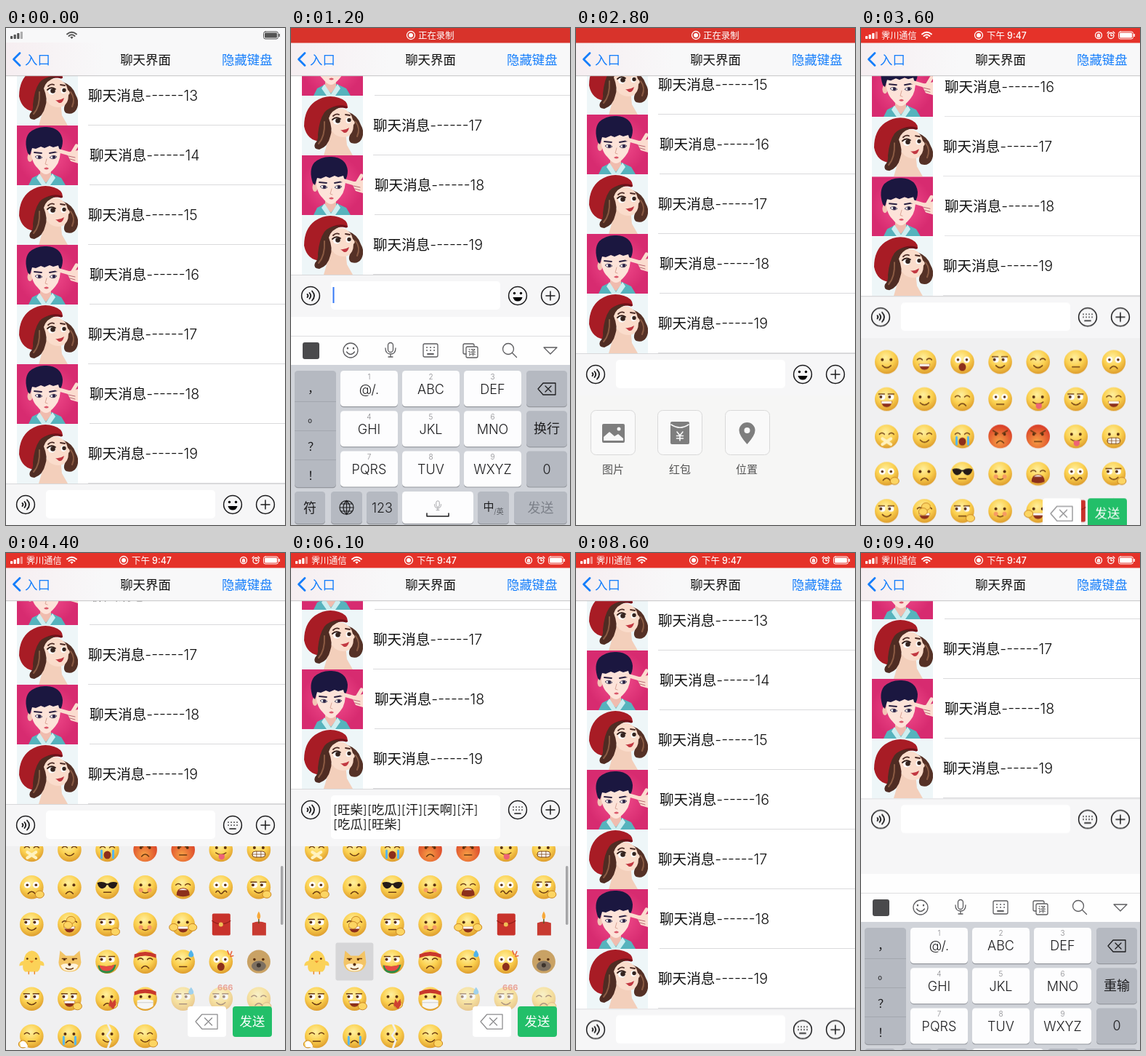
Recreate the animation shown at these times as an HTML page. Size 384 px wide and 683 px high, loop 9.5 s.

```html
<!DOCTYPE html>
<html lang="zh-CN">
<head>
<meta charset="utf-8">
<title>聊天界面</title>
<style>
html, body { margin: 0; width: 100%; height: 100%; overflow: hidden; background: #fff; }
svg { display: block; font-family: Inter, "Noto Sans CJK SC", "Noto Sans CJK", sans-serif; }
.mid { text-anchor: middle; }
.thin { font-weight: 300; }
.line { fill: none; stroke: currentColor; stroke-linecap: round; stroke-linejoin: round; }
.bar, .field, .kb, .panel, .rows, .thumb { animation: 9500ms ease-in-out infinite; }
.bar { animation-name: bar; }
.field { animation-name: field; }
.kb { animation-name: kb; }
.panel { animation-name: panel; }
.rows { animation-name: rows; }
.thumb { animation-name: thumb; }
@keyframes bar {
  0%, 8.42% { transform: translateY(626px); }
  11.58%, 25.26% { transform: translateY(339px); }
  28.42%, 35.79% { transform: translateY(447px); }
  38.95%, 61.58% { transform: translateY(345px); }
  62.4%, 69.68% { transform: translateY(324px); }
  70.5%, 78.37% { transform: translateY(345px); }
  82.63%, 90.53% { transform: translateY(626px); }
  93.68%, 96.84% { transform: translateY(345px); }
  98.8%, 100% { transform: translateY(337px); }
}
@keyframes field {
  0%, 61.58% { height: 39px; }
  62.4%, 69.68% { height: 60px; }
  70.5%, 100% { height: 39px; }
}
@keyframes kb {
  0%, 8.42% { transform: translateY(290px); }
  11.58%, 25.26% { transform: translateY(0); }
  28.42%, 96.84% { transform: translateY(290px); animation-timing-function: linear; }
  98.95% { transform: translateY(44px); }
  100% { transform: translateY(4px); }
}
@keyframes panel {
  0%, 35.79% { transform: translateY(505px); opacity: 1; }
  38.95%, 78.37% { transform: translateY(403px); opacity: 1; }
  82.63% { transform: translateY(684px); opacity: 0; }
  82.7%, 90.53% { transform: translateY(684px); opacity: 1; }
  93.68%, 96.84% { transform: translateY(403px); opacity: 1; }
  97.9%, 100% { transform: translateY(403px); opacity: 0; }
}
@keyframes rows {
  0%, 40% { transform: translateY(130px); animation-timing-function: ease-out; }
  45.26%, 100% { transform: translateY(0); }
}
@keyframes thumb {
  0%, 40% { transform: translateY(-25px); animation-timing-function: ease-out; }
  45.26%, 100% { transform: translateY(0); }
}
</style>
</head>
<body>
<svg width="384" height="683" viewBox="0 0 384 683">
  <defs>
    <radialGradient id="gold" cx=".45" cy=".32" r=".7">
      <stop offset="0" stop-color="#fff0a0"/><stop offset=".55" stop-color="#fbd04f"/><stop offset="1" stop-color="#dc9a2c"/>
    </radialGradient>
    <radialGradient id="angry" cx=".45" cy=".7" r=".8">
      <stop offset="0" stop-color="#f7a045"/><stop offset="1" stop-color="#d42c22"/>
    </radialGradient>
    <radialGradient id="pink">
      <stop offset="0" stop-color="#f4508f"/><stop offset="1" stop-color="#d72b70"/>
    </radialGradient>
    <linearGradient id="tint">
      <stop offset="0" stop-color="#f6eef1"/><stop offset=".35" stop-color="#f8f8f9"/>
    </linearGradient>
    <clipPath id="face"><rect width="84" height="82"/></clipPath>
    <clipPath id="sheet"><rect width="384" height="290"/></clipPath>

    <g id="boy" clip-path="url(#face)">
      <rect width="84" height="82" fill="url(#pink)"/>
      <path d="M16 82l5-10 12-6h15l13 6 6 10z" fill="#56b3bd"/>
      <path d="M32 58h15v12l-7 9-8-9z" fill="#f0bcae"/>
      <path d="M31 66l9 14 9-14 4 6-7 10H34l-7-10z" fill="#cdeef0"/>
      <ellipse cx="18" cy="44" rx="3.5" ry="6" fill="#f3c5b6"/>
      <path d="M19 28h41q1 20-7 29-8 10-13 10t-12-9Q19 50 19 28z" fill="#fde3d9"/>
      <path d="M15 38Q9 20 17 10 27 1 41 2q20 1 22 19 0 9-4 14l-2-7-7 2-5-2-7 3-5-2-7 3-5-1-3 10z" fill="#1b1740"/>
      <path class="line" d="M24 37l10 1M45 38l11-2" color="#2a2040" stroke-width="1.8"/>
      <path d="M25 43q5-4 10 1-5 4-10-1zM45 44q5-5 10-1-5 5-10 1z" fill="#fff" stroke="#2c2446" stroke-width=".8"/>
      <g fill="#2c2446"><circle cx="31" cy="43.500" r="2.200"/><circle cx="51" cy="43.500" r="2.200"/></g>
      <path class="line" d="M41 46l-2 7 3 1" color="#dba596" stroke-width="1"/>
      <path d="M37 59q4-3 7 0-3 3-7 0z" fill="#d9576a"/>
      <path class="line" d="M76 40L55 34M76 38l6-10" color="#fbdccf" stroke-width="5"/>
      <path d="M68 37l16-3v18l-10-3z" fill="#fbdccf"/>
      <path class="line" d="M71 42l9 2M73 46l7 2" color="#b86572" stroke-width="1"/>
    </g>
    <g id="girl" clip-path="url(#face)">
      <rect width="84" height="82" fill="#eef6f8"/>
      <path d="M63 22q14 5 18 18 6 10 1 20-5 8-14 5-5-3-2-11z" fill="#553126"/>
      <path d="M40 48h20l2 20 8 14H30z" fill="#f3cfbb"/>
      <path d="M3 42Q3 19 18 8 34-3 51 3q13 4 12 14-16-3-25 8-9 14-12 38Q7 62 3 42z" fill="#a81c25"/>
      <path class="line" d="M26 58Q26 30 37 21q10-9 24-5" color="#701019" stroke-width="3"/>
      <path d="M35 28q6-13 22-10 11 4 13 15 5 4 1 7 0 12-8 16-9 3-18-3-9-9-10-25z" fill="#fadccb"/>
      <path d="M53 16q-13 4-16 15 6 15 2 25-3 14-15 18-9-1-6-8 5-5 4-13 2-20 9-30 9-10 22-7z" fill="#4f2c23"/>
      <path class="line" d="M31 36q1 20-8 30M74 36q7 9 2 20" color="#8a5a43" stroke-width="2"/>
      <path class="line" d="M43 28q4-4 8-2M60 26l6 1" color="#4b2b25" stroke-width="1.800"/>
      <g fill="#fff"><ellipse cx="48" cy="35" rx="5" ry="4.500"/><ellipse cx="64" cy="34" rx="3.500" ry="4"/></g>
      <g fill="#35241f"><circle cx="49.500" cy="34.500" r="3.300"/><circle cx="65" cy="33.500" r="2.700"/></g>
      <path class="line" d="M42 33q5-5 11-1" color="#2f1c18" stroke-width="1.800"/>
      <path d="M53 47q6 1 12-3-2 8-7 7z" fill="#c23842"/>
    </g>
    <g id="keys-icon">
      <circle class="line" r="12.4" stroke-width="1.5"/>
      <path class="line" d="M-6-4h.1M-2-4h.1M2-4h.1M6-4h.1M-6 0h.1M-2 0h.1M2 0h.1M6 0h.1M-4 5h8" stroke-width="1.7"/>
    </g>
    <path id="erase" class="line" d="M-12 0l7-8H12V8H-5zM-2-4l8 8M6-4l-8 8"/>
    <path id="mic" class="line" d="M-3.5-6a3.5 3.5 0 0 1 7 0v6a3.5 3.5 0 0 1-7 0zM-7-2q0 8 7 8t7-8M0 6v4M-3 10h6"/>
  </defs>

  <rect width="384" height="683" fill="#fff"/>
  <g id="list" class="bar thin"></g>

  <g class="bar">
    <rect width="384" height="700" fill="#f6f6f7"/>
    <path d="M0 .5h384" stroke="#d8d8da"/>
    <rect class="field" x="55" y="9" width="233" height="39" rx="5" fill="#fff"/>
    <g class="line" color="#1c1c1e" stroke-width="1.5">
      <circle cx="27" cy="29" r="12.4"/>
      <path d="M22.500 27q2 2 0 4M25.500 25q3.500 4 0 8M29 22.500q6 6.500 0 13" stroke-width="1.800"/>
      <circle cx="357" cy="29" r="12.4"/>
      <path d="M351 29h12M357 23v12"/>
    </g>
    <g transform="translate(312 29)" color="#1c1c1e">
      <g data-on="0-3400">
        <circle class="line" r="12.4" stroke-width="1.5"/>
        <circle cx="-4.500" cy="-3.500" r="1.7"/><circle cx="4.500" cy="-3.500" r="1.7"/>
        <path d="M-6.500 2H6.500Q5 7.500 0 7.500T-6.500 2z"/>
      </g>
      <use href="#keys-icon" data-on="3400-9500"/>
    </g>
    <rect data-on="900-1500 2000-2400" x="57.500" y="17" width="2" height="22" fill="#3478f6"/>
    <g id="typed" class="thin" font-size="17.4" fill="#1b1b1b"></g>
    <text data-on="7445-8600" class="mid thin" x="169" y="36.500" font-size="18.500" fill="#a6a6a8">按住说话</text>
  </g>

  <g data-on="2400-3400" transform="translate(0 505)" fill="#7e7e7e">
    <rect width="384" height="178" fill="#f6f6f5"/>
    <g fill="#f9f9f9" stroke="#d9d9d9">
      <rect x="20.500" y="20.500" width="61" height="61" rx="7"/><rect x="112.500" y="20.500" width="61" height="61" rx="7"/><rect x="205.500" y="20.500" width="61" height="61" rx="7"/>
    </g>
    <rect x="36" y="39" width="31" height="26" rx="2"/>
    <path d="M38 62v-5l8-7 7 6 5-3 7 6v3z" fill="#f9f9f9"/><circle cx="59" cy="46" r="2.500" fill="#f9f9f9"/>
    <rect x="130" y="36" width="26" height="31" rx="2"/>
    <g class="line" color="#f9f9f9" stroke-width="1.6"><path d="M131 40q12 8 24 0M139 50l4 5 4-5M143 55v7M138.500 55.500h9M138.500 59h9"/></g>
    <path d="M235.500 67q-11-12-11-19a11 11 0 0 1 22 0q0 7-11 19z"/><circle cx="235.500" cy="48" r="4" fill="#f9f9f9"/>
    <g class="mid thin" font-size="15" fill="#555"><text x="51" y="107">图片</text><text x="143" y="107">红包</text><text x="235" y="107">位置</text></g>
  </g>

  <g class="panel" data-on="3400-9500">
    <g clip-path="url(#sheet)">
      <rect width="384" height="290" fill="#f0f0f1"/>
      <g id="emoji" class="rows"></g>
    </g>
    <rect class="thumb" data-on="3800-6700" x="378" y="27" width="3.500" height="81" rx="1.700" fill="#a6a6a8"/>
    <rect x="250" y="220" width="53" height="42" rx="4" fill="#fff"/>
    <use href="#erase" transform="translate(276 241) scale(1.25)" color="#8b8b8d" stroke-width="1"/>
    <rect x="312" y="220" width="54" height="42" rx="4" fill="#22bf69"/>
    <text class="mid" x="339" y="247" font-size="17.4" fill="#fff">发送</text>
  </g>

  <g class="kb">
    <rect y="397" width="384" height="66" fill="#fefefe"/>
    <path d="M0 423.500h384" stroke="#dedee0"/>
    <rect y="463" width="384" height="222" fill="#d0d3d9"/>
    <rect x="16" y="432" width="23" height="23" rx="3" fill="#4a4a4c"/>
    <g class="line" color="#5c5c5f" stroke-width="1.3">
      <circle cx="82" cy="443" r="10"/><path d="M78 440v.2M86 440v.2" stroke-width="2.400"/><path d="M76.500 445q5.500 7 11 0"/>
      <use href="#mic" x="137" y="442"/>
      <rect x="182" y="434" width="20" height="18" rx="2"/>
      <path d="M187 439h.1M192 439h.1M197 439h.1M187 443h.1M192 443h.1M197 443h.1M188 448h8" stroke-width="1.800"/>
      <path d="M241 448h-2q-2 0-2-2v-10q0-2 2-2h11q2 0 2 2v1"/><rect x="241" y="438" width="16" height="15" rx="2"/>
      <circle cx="299" cy="441" r="7.500"/><path d="M304.500 446.500l6 6M348 439h18l-9 9z"/>
    </g>
    <text class="mid" x="249" y="450" font-size="11" fill="#4a4a4c">译</text>
    <g id="keys" class="mid thin" font-size="18" fill="#1d1d1f"></g>
  </g>

  <rect y="20" width="384" height="46" fill="url(#tint)"/>
  <path d="M0 65.700h384" stroke="#c4c4c6"/>
  <path class="line" d="M19 34.500L10.500 43l8.500 8.500" color="#157efb" stroke-width="2.800"/>
  <g font-size="17.4" fill="#157efb">
    <g class="thin"><text x="26" y="49.500">入口</text><text x="297" y="49.500">隐藏键盘</text></g>
    <text class="mid" x="192" y="49.500" fill="#111" font-weight="500">聊天界面</text>
  </g>

  <rect width="384" height="20" fill="#f8f8f9"/>
  <rect data-on="300-3500" width="384" height="20.500" fill="#d8332b"/>
  <g data-on="300-3500" fill="#fff">
    <circle cx="165" cy="10" r="5.500" fill="none" stroke="#fff" stroke-width="1.300"/><circle cx="165" cy="10" r="3"/>
    <text x="175" y="14.500" font-size="12.400">正在录制</text>
  </g>
  <rect data-on="3500-9500" width="384" height="20.500" fill="#e53229"/>
  <g data-on="0-300" id="dark" color="#555" fill="#555"></g>
  <g data-on="3500-9500" color="#fff" fill="#fff">
    <g id="light"></g>
    <text x="28" y="14.500" font-size="12.200">霁川通信</text>
    <circle cx="162" cy="10" r="5.500" fill="none" stroke="#fff" stroke-width="1.300"/><circle cx="162" cy="10" r="3"/>
    <text x="173" y="14.500" font-size="12.400" font-weight="500">下午 9:47</text>
    <g class="line" stroke-width="1.300"><circle cx="327" cy="10" r="4.500"/><path d="M325.500 10h3v2h-3zM326 10v-1.500h2V10"/><circle cx="344" cy="10.500" r="4"/><path d="M344 8v2.500h2M339 7l2-2M349 7l-2-2"/></g>
  </g>
</svg>
<script>
const LOOP = 9500;
const $ = id => document.getElementById(id);
const text = (x, y, s, more = '') => `<text x="${x}" y="${y}" ${more}>${s}</text>`;
const stroke = (d, color = '#6b3a12', w = 1.5) => `<path class="line" d="${d}" color="${color}" stroke-width="${w}"/>`;
const shape = (d, fill) => `<path d="${d}" fill="${fill}"/>`;
const dot = (x, y, r, fill = '#5a3010') => `<circle cx="${x}" cy="${y}" r="${r}" fill="${fill}"/>`;
const pair = (r, fill, dx = 0, y = -3) => dot(-6 + dx, y, r, fill) + dot(6 + dx, y, r, fill);

// Status icons
const status = [4, 6, 8, 10].map((h, i) =>
  `<rect x="${6 + i * 4.6}" y="${15 - h}" width="3.2" height="${h}" rx=".8" ${i > 2 ? 'opacity=".45"' : ''}/>`).join('') +
  stroke('M84 8.500q6.500-5.500 13 0M86.500 11q4-3.500 8 0', 'currentColor', 1.9) + '<path d="M90.500 15l-2.200-2.500q2.200-1.600 4.400 0z"/>' +
  '<rect class="line" x="354.500" y="5" width="20" height="10" rx="2.500"/><rect x="356" y="6.500" width="17" height="7" rx="1"/><rect x="375.500" y="8" width="1.500" height="4"/>';
$('dark').innerHTML = $('light').innerHTML = status;

// Message rows, stacked upwards from the input bar
for (let n = 11; n < 20; n++) {
  const y = (n - 20) * 82, girl = n % 2, x = girl ? 113 : 115;
  $('list').innerHTML += `<use href="#${girl ? 'girl' : 'boy'}" x="15" y="${y}"/>` +
    text(x, y + 48, `聊天消息------${n}`, 'font-size="19.6" fill="#111"') +
    `<path d="M${x} ${y + 81.5}H384" stroke="#dadadc"/>`;
}

// Emoji
const hand = (x, y) => `<ellipse cx="${x}" cy="${y}" rx="6" ry="5" fill="#fcd563" stroke="#c98522"/>`;
const PARTS = {
  dot: pair(2), shut: stroke('M-10-3q3.500-3.500 7 0M3-3q3.500-3.500 7 0'),
  wide: pair(4.4, '#fff') + pair(1.8),
  side: pair(4, '#fff') + pair(2, '#5a3010', -2) + stroke('M-11-7h8M2-7h8'),
  glare: pair(2) + stroke('M-10-8l7 4M10-8l-7 4'),
  shade: shape('M-14-6q7-3 13 1h2q6-4 13-1-2 8-7 8-5-1-6-5h-2q-1 4-6 5-5 0-7-8z', '#241b18'),
  smile: stroke('M-6 5q6 6 12 0'), frown: stroke('M-5 9q5-6 10 0'), flat: stroke('M-5 7h10'),
  wave: stroke('M-7 7q3-4 5 0t5 0 5 0'), cross: stroke('M-6 3l12 8M6 3l-12 8', '#fff2c0', 4),
  grin: shape('M-8 3H8Q6 11 0 11t-8-8z', '#8c2f1b') + shape('M-7 3H7v3H-7z', '#fff'),
  teeth: `<rect x="-9" y="2" width="18" height="8" rx="4" fill="#fff" stroke="#7a4416"/>` + stroke('M-9 6H9M-3 2v8M3 2v8', '#7a4416', .8),
  open: '<ellipse cy="7" rx="5" ry="5.500" fill="#8c2f1b"/>',
  scream: shape('M-9 11Q-9 1 0 1t9 10q-9 4-18 0z', '#8c2f1b') + shape('M-6 4q6-4 12 0z', '#fff'),
  tongue: stroke('M-7 4q7 5 14 0') + shape('M-3 6h8v5q-4 5-8 0z', '#ee6276'),
  tears: stroke('M-8 1v10M8 1v10', '#58b6ec', 3), blush: pair(3, '#f69a63', 0, 4),
  sweat: shape('M11-16q7 9 0 10-7-1 0-10z', '#4eb2ea'),
  spark: stroke('M9-15l2 5M15-14l-2 5M17-8l-4 1', '#e9633f', 1.5),
  hand: hand(11, 10), hands: hand(-13, 4) + hand(13, 4), palm: hand(2, -6) + hand(-2, 1),
  band: shape('M-15-10q15-7 30 0v5q-15-6-30 0z', '#c9372c'),
  melon: shape('M-13 5q14 3 25-1-2 12-13 12T-13 5z', '#2f8c46') + shape('M-11 5q12 3 21-1-2 9-11 9T-11 5z', '#e64a43'),
  redhand: hand(8, 8) + shape('M4 0l3 5 4-5 1 8-4 6-6-5z', '#cf4030'),
  mask: shape('M-11 2q11-3 22 0v8q-11 8-22 0z', '#f6f6f4') + stroke('M-11 5h22', '#ccc', 1),
  cloud: hand(-12, 11) + shape('M-16 9q4-5 8 0t2 6h-9z', '#fff'),
  split: shape('M-1-17l4 9-5 7 5 7-4 11h3l4-11-5-7 5-7-4-9z', '#f0f0f1'),
  six: text(6, -12, '666', 'class="mid" font-size="11" font-weight="700" fill="#e2573e"')
};
const THINGS = {
  packet: '<rect x="-12" y="-15" width="25" height="30" rx="2" fill="#c8322b"/>' + stroke('M-12-5Q0 4 13-5', '#952019', 1.2) + dot(0, 0, 3, '#f0bd55'),
  candle: shape('M-9-2q9-4 19 0v17H-9z', '#c83a31') + stroke('M0-2v-5', '#552') + shape('M0-18q5 8 0 11-5-3 0-11z', '#f7a83a'),
  chick: shape('M-9 14q-4-3-3-9l-5 1q0-6 6-7Q-9-14 0-15q10 1 12 14 6 1 5 7l-5-1q0 6-4 9z', '#fbd258') + pair(1.4, '#5a3010', 0, -4) + shape('M-3-1h6l-3 3z', '#ee8a2a') + stroke('M-4 14v3M4 14v3', '#ee8a2a'),
  dog: shape('M-15 1l2-16 8 7H6l8-7 2 16q-2 13-16 13T-15 1z', '#f3c465') + shape('M-12 5q6-4 12-1 7-3 12 1-2 8-12 8T-12 5z', '#fff3dd') + stroke('M-10-4h6M4-4h6') + pair(1.6, '#5a3010', -1) + dot(0, 4, 2) + stroke('M-5 9q5 3 10 0'),
  beaver: dot(0, 0, 16, '#c9a265') + pair(1.8) + '<ellipse cy="6" rx="10" ry="7" fill="#7d7061"/>' + dot(0, 5, 3, '#3d342d')
};
const draw = names => {
  const parts = names.split(' ');
  const base = dot(0, 0, 16.3, parts.includes('red') ? 'url(#angry)' : 'url(#gold)');
  const body = THINGS[names] || base + parts.map(p => PARTS[p] || '').join('');
  return parts.includes('fade') ? `<g opacity=".5">${body}</g>` : body;
};
const EMOJI = [
  'dot smile,shut grin,wide open,side smile,shut smile,dot flat,wide frown',
  'side grin,dot smile,shut frown,wide flat,dot tongue,side smile,shut grin',
  'shut cross,shut smile,shut open tears,glare frown red,glare flat red,dot tongue,dot teeth',
  'wide frown hand,dot frown,shade flat,dot smile blush,shut scream,wide wave,side smile hand',
  'side smile,shut grin palm,side flat hand,dot smile blush,dot grin hands,packet,candle',
  'chick,dog,side melon,shut frown band,shut flat sweat,wide open spark,beaver',
  'side smile,side grin hand,dot frown redhand,dot mask band,side flat sweat fade,side smile six fade,shut frown hand fade',
  'shut flat cloud,dot frown tears,dot smile split,shut smile hand'
];
const colX = c => 35.3 + c * 52.1, rowY = r => 5 + (r - 2) * 51.2;

// Taps on the emoji sheet: each types a token, later erased in reverse
const TAPS = [['旺柴', 1], ['吃瓜', 2], ['汗', 4], ['天啊', 5], ['汗', 4], ['吃瓜', 2], ['旺柴', 1]];
const tapAt = i => 4700 + 230 * i, eraseAt = i => 6500 + 120 * (6 - i);
const tokens = TAPS.map(([word], i) => `<tspan data-on="${tapAt(i)}-${eraseAt(i)}">[${word}]</tspan>`);
$('typed').innerHTML = text(58, 35, tokens.slice(0, 5).join('')) + text(58, 55, tokens.slice(5).join(''));

$('emoji').innerHTML = TAPS.map(([, c], i) =>
  `<rect data-on="${tapAt(i) - 60}-${tapAt(i) + 120}" x="${colX(c) - 26}" y="${rowY(5) - 26}" width="52" height="52" rx="3" fill="#d6d6d8"/>`).join('') +
  EMOJI.map((row, r) => row.split(',').map((e, c) =>
    `<g transform="translate(${colX(c)} ${rowY(r)})">${draw(e)}</g>`).join('')).join('');

// Keyboard
const GREY = '#b5b9c1';
const key = (x, y, w, h, fill = GREY) =>
  `<rect x="${x}" y="${y + 1.2}" width="${w}" height="${h}" rx="4.500" fill="#94979d"/><rect x="${x}" y="${y}" width="${w}" height="${h}" rx="4.500" fill="${fill}"/>`;
const rowTop = r => 471 + r * 55.2;
let keys = key(5, 471, 57, 160);
['，', '。', '？', '！'].forEach((s, i) => {
  keys += text(31, 501 + i * 40, s, 'font-size="16"');
  if (i) keys += `<path d="M5 ${473.5 + i * 40}h57" stroke="#a3a7af"/>`;
});
['@/.', 'ABC', 'DEF', 'GHI', 'JKL', 'MNO', 'PQRS', 'TUV', 'WXYZ'].forEach((s, i) => {
  const x = 68 + i % 3 * 85, y = rowTop(Math.floor(i / 3));
  keys += key(x, y, 79, 49, '#fdfdfe') + text(x + 39.5, y + 11.5, i + 1, 'font-size="10" fill="#88888c"') + text(x + 39.5, y + 31.5, s);
});
for (let r = 0; r < 3; r++) keys += key(324, rowTop(r), 56, 49);
keys += '<use href="#erase" x="352" y="496" color="#1d1d1f" stroke-width="1.300"/>' +
  text(352, 557, '换行', 'data-on="0-3400"') + text(352, 557, '重输', 'data-on="3400-9500"') + text(352, 612.5, '0');
[[5, 42, '符'], [55, 43, ''], [104, 43, '123'], [257, 43, ''], [307, 73, '发送']].forEach(([x, w, s]) => {
  keys += key(x, 637, w, 44) + text(x + w / 2, 665.5, s, w > 50 ? 'fill="#7c8089"' : '');
});
keys += key(153, 637, 98, 44, '#fdfdfe') +
  '<g transform="translate(202 656) scale(.65)" color="#a5a5a9" stroke-width="1.500"><use href="#mic"/></g>' +
  stroke('M187 667v4h30v-4', '#1d1d1f', 1.5) +
  stroke('M67 659a9.500 9.500 0 1 0 19 0a9.500 9.500 0 1 0-19 0M67 659h19M76.500 649.500v19M69 654h15M69 664h15M76.500 649.500q-9 9.500 0 19M76.500 649.500q9 9.500 0 19', '#1d1d1f', 1.2) +
  text(272, 663, '中', 'font-size="15"') + text(286, 668, '/英', 'font-size="10" fill="#55585e"');
$('keys').innerHTML = keys;

// Hard switches: data-on holds "from-to" spans in ms
const timed = [...document.querySelectorAll('[data-on]')].map(el =>
  [el, el.dataset.on.split(' ').map(s => s.split('-').map(Number))]);
const start = performance.now();
function tick() {
  const t = (performance.now() - start) % LOOP;
  for (const [el, spans] of timed)
    el.style.visibility = spans.some(([a, b]) => t >= a && t < b) ? 'visible' : 'hidden';
  requestAnimationFrame(tick);
}
tick();
</script>
</body>
</html>
```
